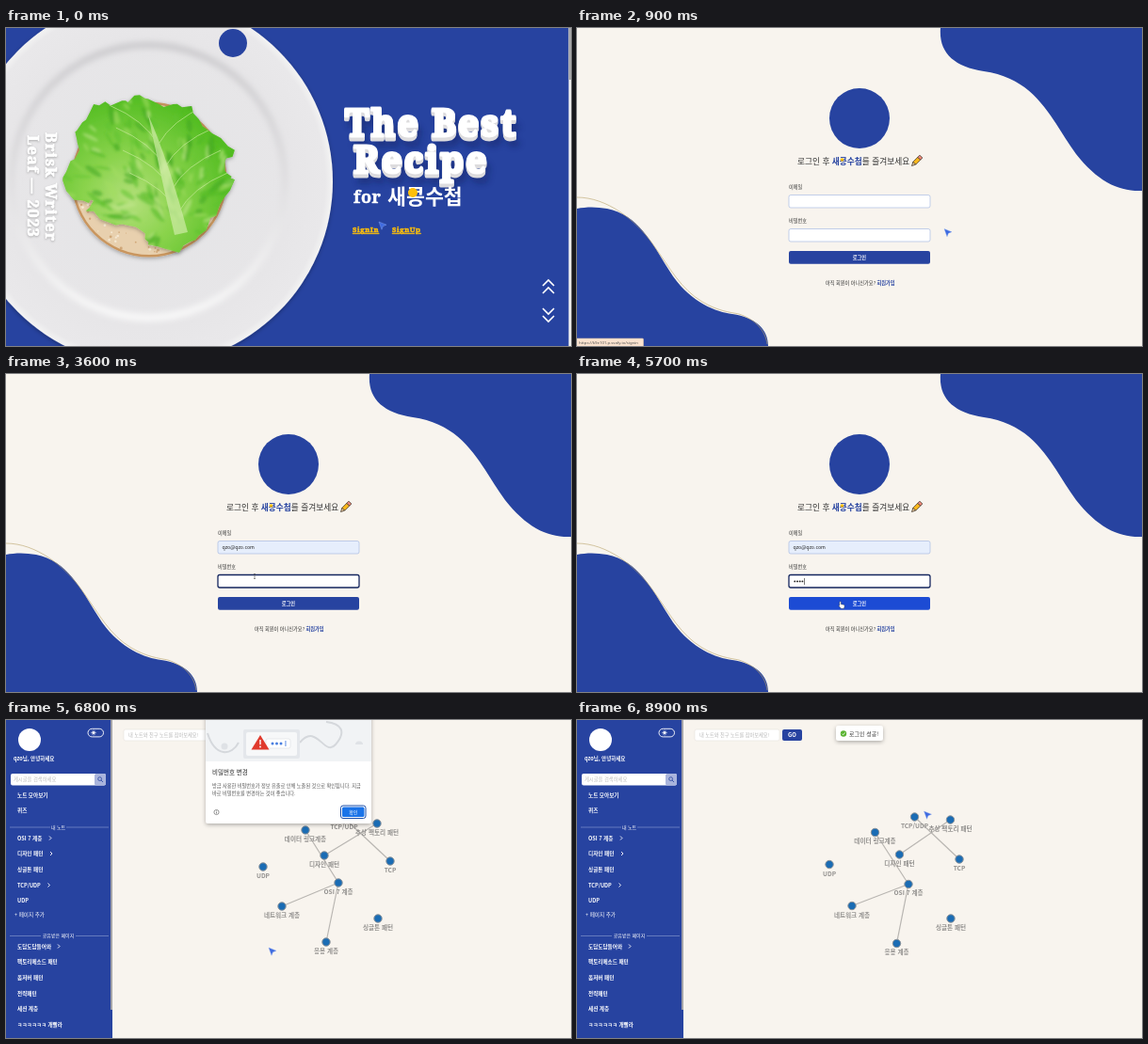
An HTML page for the animation above (9 s loop, 600 px wide and 338 px high).

```html
<!DOCTYPE html>
<html lang="ko">
<head>
<meta charset="utf-8">
<style>
html, body { margin: 0; width: 100%; height: 100%; overflow: hidden; background: #f8f4ee; }
svg { display: block; width: 600px; height: 338px; font-family: "Noto Sans CJK KR", "Noto Sans CJK", sans-serif; }
.serif { font-family: "Noto Serif", serif; font-weight: 900; stroke-linejoin: round; letter-spacing: .6px; }
.big { font-size: 39px; stroke-width: 2.8; letter-spacing: 2px; }
.side { font-size: 16px; stroke-width: .8; letter-spacing: 1.2px; }
.b { font-weight: 700; }
.m { text-anchor: middle; }
</style>
</head>
<body>
<svg id="stage" viewBox="0 0 600 338">
  <defs>
    <radialGradient id="china">
      <stop offset="0" stop-color="#e4e4e6"/><stop offset=".8" stop-color="#e7e6e8"/>
      <stop offset=".96" stop-color="#e9e8ea"/><stop offset="1" stop-color="#f3f3f3"/>
    </radialGradient>
    <linearGradient id="lip" x1="0" y1="0" x2="0" y2="1">
      <stop offset="0" stop-color="#cbcacd"/><stop offset=".5" stop-color="#dfdee0"/>
      <stop offset="1" stop-color="#fafafa"/>
    </linearGradient>
    <radialGradient id="green" gradientUnits="userSpaceOnUse" cx="132" cy="184" r="112">
      <stop offset="0" stop-color="#b4e07c"/><stop offset=".45" stop-color="#8ad34c"/>
      <stop offset="1" stop-color="#53bd22"/>
    </radialGradient>
    <filter id="soft"><feGaussianBlur stdDeviation="1.6"/></filter>
    <filter id="fade" x="-20%" y="-20%" width="140%" height="140%"><feGaussianBlur stdDeviation="3"/></filter>
    <filter id="shade" x="-30%" y="-30%" width="160%" height="160%">
      <feDropShadow dx="0" dy="1.5" stdDeviation="2" flood-opacity=".3"/>
    </filter>
  </defs>
  <g id="home"></g>
  <g id="login"></g>
  <g id="app"></g>
  <g id="hint"></g>
  <g id="pointer"></g>
</svg>
<script>
const BLUE = '#2743a0', CREAM = '#f8f4ee', YELLOW = '#fdbf0a';
const $ = id => document.getElementById(id);
const put = (id, html) => { $(id).innerHTML = html; };
const show = (id, on) => $(id).setAttribute('display', on ? 'inline' : 'none');
const set = (id, attrs) => { for (const k in attrs) $(id).setAttribute(k, attrs[k]); };
const clamp = v => Math.max(0, Math.min(1, v));
const ease = v => v * v * (3 - 2 * v);

const text = (x, y, size, str, fill = '#333', more = '') =>
  `<text x="${x}" y="${y}" font-size="${size}" fill="${fill}" ${more}>${str}</text>`;
const rect = (x, y, w, h, r, fill, more = '') =>
  `<rect x="${x}" y="${y}" width="${w}" height="${h}" rx="${r}" fill="${fill}" ${more}/>`;
const disc = (x, y, r, fill, more = '') =>
  `<circle cx="${x}" cy="${y}" r="${r}" fill="${fill}" ${more}/>`;
const line = (d, stroke, w, more = '') =>
  `<path d="${d}" fill="none" stroke="${stroke}" stroke-width="${w}" ${more}/>`;

let seed = 7;
const rnd = () => (seed = seed * 16807 % 2147483647) / 2147483647;

// Ruffled lettuce: a coarse outline, subdivided with jitter
function lettuce() {
  const rim = [[94,82],[121,80],[139,73],[169,82],[195,82],[211,108],[241,130],[232,150],[243,162],
    [222,198],[206,220],[185,238],[153,233],[147,214],[116,209],[84,193],[92,184],[68,182],[59,159],[76,129],[73,108]];
  const edge = rim.flatMap(([x, y], i) => {
    const [u, v] = rim[(i + 1) % rim.length];
    return [0, .25, .5, .75].map(k =>
      [x + (u - x) * k + rnd() * 6 - 3, y + (v - y) * k + rnd() * 6 - 3].map(n => n.toFixed(1)));
  });
  const shape = 'M' + edge.join('L') + 'Z';
  let folds = '', veins = '';
  const tones = ['#3fa51b', '#a3dc63', '#5ec22d', '#c2e78f', '#4eb823'];
  for (let i = 0; i < 170; i++) {
    const a = rnd() * 6.283, r = 15 + rnd() * 75;
    const x = 152 + r * Math.cos(a), y = 157 + r * Math.sin(a);
    const lean = Math.atan2(y - 208, x - 182) * 57.3 + rnd() * 60 - 30;
    folds += `<ellipse cx="${x}" cy="${y}" rx="${4 + rnd() * 9}" ry="${1 + rnd() * 2.5}" fill="${tones[i % 5]}"
      opacity=".55" transform="rotate(${lean} ${x} ${y})"/>`;
  }
  for (let i = 0; i < 8; i++) {
    const y = 196 - (i >> 1) * 24, x = 152 + (y - 92) * .3, side = i % 2 ? 1 : -1;
    veins += line(`M${x} ${y}q${side * 14} -26 ${side * 52} -42`, '#d3efa8', 1);
  }
  return `<clipPath id="leaf"><path d="${shape}"/></clipPath>
    <path d="${shape}" fill="url(#green)" filter="url(#shade)"/>
    <g clip-path="url(#leaf)"><g filter="url(#soft)">${folds}</g><g opacity=".6">${veins}
    <path d="M193 217L179 220Q166 165 151 92Q172 140 193 217" fill="#dcf0b8"/></g></g>`;
}

function crumbs() {
  let s = '';
  for (let i = 0; i < 140; i++) {
    const a = rnd() * 6.283, r = 62 + rnd() * 17;
    s += disc(152 + r * Math.cos(a), 161 + r * Math.sin(a), .5 + rnd(), i % 2 ? '#d0a778' : '#f5e8d2');
  }
  return s;
}

const title = (x, y, fill) => `<g class="serif big" fill="${fill}" stroke="${fill}" transform="translate(${x} ${y})">
  <text x="360" y="115">The Best</text><text x="369" y="154">Recipe</text></g>`;
const slab = (x, y, size, str, fill, more = '') =>
  text(x, y, size, str, fill, `class="serif" stroke="${fill}" stroke-width=".5" ${more}`);

put('home', rect(0, 0, 600, 338, 0, BLUE) +
  disc(151, 163, 196, 'url(#china)', 'filter="url(#shade)"') +
  disc(151, 163, 145, 'none', 'stroke="url(#lip)" stroke-width="7" filter="url(#fade)"') +
  `<g id="dish">${disc(152, 161, 82.5, '#c9965f', 'filter="url(#shade)"')}${disc(152, 161, 80, '#e8d0ae')}
    ${crumbs()}${lettuce()}${disc(241, 16, 15, BLUE)}</g>
  <g class="serif side" fill="#fff" stroke="#fff" style="filter:drop-shadow(0 1px 1px #8889)">
    <text transform="translate(42 111) rotate(90)">Brisk Writer</text>
    <text transform="translate(23 114) rotate(90)">Leaf — 2023</text></g>
  <g opacity=".4" filter="url(#fade)">${title(4, 10, '#0b1a55')}</g>` +
  [4, 3, 2, 1].map(d => title(0, d, '#dddcde')).join('') + title(0, 0, '#fff') +
  slab(369, 186, 18, 'for', '#fff') +
  text(405, 187, 21.7, '새콩수첩', '#fff', 'class="b"') + disc(432, 175, 5, YELLOW) +
  slab(368, 217, 7.6, 'SignIn', YELLOW, 'id="signin" text-decoration="underline"') +
  slab(410, 217, 7.6, 'SignUp', YELLOW, 'text-decoration="underline"') +
  line('M570 274l6-6 6 6m-12 8l6-6 6 6M570 298l6 6 6-6m-12 8l6 6 6-6', '#fff', 1.6, 'id="chevrons"') +
  rect(597.5, 0, 2.5, 338, 0, '#f1f1f1') + rect(597.5, 0, 2.5, 55, 0, '#a9a9ab'));

put('login', rect(0, 0, 600, 338, 0, CREAM) +
  `<path fill="${BLUE}" d="M386 0C384 26 400 41 432 46C489 54 504 98 530 134C553 163 575 174 600 173V0Z
    M0 192C10 190 21 190 32 192C68 199 82 234 102 264C122 292 148 302 165 304C190 308 203 320 203 338H0Z"/>` +
  line('M0 180C32 180 62 204 80 229C100 257 110 277 133 291C150 301 162 302 172 304C190 310 200 322 202 336', '#b9a36a', .6) +
  disc(300, 96, 32, BLUE) +
  text(234, 145, 8.7, `로그인 후 <tspan class="b" fill="${BLUE}">새콩수첩</tspan>를 즐겨보세요`) +
  disc(281.5, 140, 1.8, YELLOW) +
  `<g transform="translate(355.5 146.5) rotate(-45)" stroke="#3a3024" stroke-width=".7">
    <path d="M0 0l4-2v4z" fill="#f3d3a4"/><path d="M4-2h7v4h-7z" fill="#fbb91c"/><path d="M11-2h3v4h-3z" fill="#ef8a7c"/></g>` +
  text(225, 171, 5.2, '이메일') + text(225, 207, 5.2, '비밀번호') +
  rect(225, 177.5, 150, 13.5, 2, '#fff', 'id="mail"') + text(229.5, 186.2, 5.2, '', '#222', 'id="mailText"') +
  rect(225, 213.5, 150, 13.5, 2, '#fff', 'id="pass"') +
  `<g id="dots">${[0, 1, 2, 3].map(i => disc(231.3 + i * 2.7, 220.4, .95, '#222')).join('')}</g>` +
  rect(241, 217, .6, 7, 0, '#222', 'id="caret"') +
  rect(225, 237, 150, 13.8, 2, BLUE, 'id="enter"') + text(300, 245.8, 5.2, '로그인', '#fff', 'class="b m"') +
  text(264, 273, 5.2, `아직 회원이 아니신가요? <tspan class="b" fill="${BLUE}">회원가입</tspan>`));

// Note graph: label, opening place, resting place
const nodes = [
  ['데이터 링크계층', 318, 117, 316.5, 119.5], ['TCP/UDP', 359, 104, 358.5, 103],
  ['추상 팩토리 패턴', 394, 110, 396.5, 106], ['디자인 패턴', 338, 144, 342.5, 143],
  ['UDP', 273, 156, 268, 153.5], ['TCP', 408, 150, 406, 148], ['OSI 7 계층', 353, 173, 352, 174.5],
  ['네트워크 계층', 293, 198, 292, 197.5], ['싱글톤 패턴', 395, 211, 397, 211], ['응용 계층', 340, 236, 339.5, 237.5]];
const links = [[0, 6], [1, 5], [2, 3], [6, 7], [6, 9]];

const item = (y, str, chevron) => text(12, y + 2, 5.6, str, '#fff', 'class="b"') +
  (chevron ? line(`M${chevron - 1} ${y - 2}l2 2-2 2`, '#fff', .9) : '');
const divider = (y, str, a, b) => text(55.5, y + 1.8, 5, str, '#fff', 'class="m"') +
  line(`M4 ${y}H${a}M${b} ${y}H109`, '#8fa0d4', .6);

put('app', rect(0, 0, 600, 338, 0, CREAM) +
  rect(125, 10, 90, 12, 2, '#fff', 'stroke="#e6e2dc" stroke-width=".6"') +
  text(130, 18, 5.2, '내 노트와 친구 노트를 잡아보세요!', '#b5b5b5') +
  rect(218, 10, 21, 12, 2, BLUE) + text(228.5, 18.2, 6, 'GO', '#fff', 'class="b m"') +
  '<g id="graph"></g>' +
  rect(0, 0, 113, 338, 0, BLUE) + rect(111, 0, 2, 308, 0, '#a3a3a8') +
  disc(25, 21, 12, '#fff') +
  rect(87, 9.3, 16.5, 8.6, 4.3, 'none', 'stroke="#fff" stroke-width=".9"') +
  disc(93, 13.6, 1.4, '#fff') + line('M93 10.6v6M90 13.6h6M90.9 11.5l4.2 4.2m0-4.2l-4.2 4.2', '#fff', .5) +
  text(8, 43, 5.5, 'qzo님, 안녕하세요', '#fff', 'class="b"') +
  rect(5, 57, 101, 12.5, 2, '#fff') + rect(94, 57, 12, 12.5, 2, '#a9b4dc') +
  line('M101 64l2 2', BLUE, .8) + disc(99.6, 62.6, 1.9, 'none', `stroke="${BLUE}" stroke-width=".8"`) +
  text(8, 65, 5.3, '게시글을 검색하세요', '#bcbcbc') +
  item(80, '노트 모아보기') + item(95.5, '퀴즈') + divider(114, '내 노트', 47, 64) +
  item(125.5, 'OSI 7 계층', 47) + item(142, '디자인 패턴', 48) + item(158.5, '싱글톤 패턴') +
  item(175.5, 'TCP/UDP', 45.5) + item(192, 'UDP') + text(9, 209, 5.6, '+ 페이지 추가', '#fff') +
  divider(229.5, '공유받은 페이지', 37, 74) +
  item(240.5, '도담도담들어와', 56) + item(257, '팩토리메소드 패턴') + item(273.5, '옵저버 패턴') +
  item(290.5, '전략패턴') + item(307, '세션 계층') + item(323.5, 'ㅋㅋㅋㅋㅋㅋ 개빨라') +
  `<g id="toast">${rect(275, 6, 50, 16, 3, '#fff', 'filter="url(#shade)"')}${disc(283, 14.5, 3.2, '#5ab432')}
    ${line('M281.4 14.6l1.2 1.2 2-2.4', '#fff', .8)}${text(289, 16.7, 6, '로그인 성공!')}</g>
  <g id="dialog">${rect(212, -6, 176, 116, 3, '#fff', 'filter="url(#shade)"')}${rect(212, -6, 176, 50, 0, '#f1f3f5')}
    ${line('M214 14C222 40 240 38 247 24M312 24C330 2 338 40 350 26S356 4 340 2', '#d5d8dc', 2)}
    ${disc(232, 28, 3.5, '#dfe2e6')}${rect(252, 10, 60, 31, 2, '#e4e7eb')}${rect(255, 13, 54, 25, 2, '#f7f8f9')}
    ${rect(276, 20, 26, 10, 2, '#fff', 'stroke="#dadde1" stroke-width=".6"')}
    <path d="M270 16l9.5 15.5h-19z" fill="#e03a2d"/>${rect(269.3, 21, 1.4, 5.2, 0, '#fff')}${disc(270, 28.5, .9, '#fff')}
    ${[283, 287.5, 292].map(x => disc(x, 25, 1.5, '#4a7fe0')).join('')}${rect(296.5, 22, .9, 6, 0, '#4a7fe0')}
    <path d="M371 26a4 3.5 0 0 1 8 0z" fill="#dfe2e6"/>
    ${text(219, 58, 6.5, '비밀번호 변경', '#222', 'font-weight="500"')}
    ${text(219, 72, 5.2, '방금 사용한 비밀번호가 정보 유출로 인해 노출된 것으로 확인됩니다. 지금', '#555')}
    ${text(219, 79.8, 5.2, '바로 비밀번호를 변경하는 것이 좋습니다.', '#555')}
    ${disc(223.5, 98, 2.6, 'none', 'stroke="#555" stroke-width=".6"')}${line('M223.5 97.5v2m0-3.2v.6', '#555', .7)}
    ${rect(355.5, 91, 26.5, 13.5, 2.5, '#fff', 'stroke="#1d4fa8" stroke-width="1"')}
    ${rect(357, 92.5, 23.5, 10.5, 1.5, '#1a73e8')}${text(368.8, 99.7, 5, '확인', '#fff', 'class="m"')}</g>`);

put('hint', rect(-1, 330, 71.5, 9, 1, '#fbe3cf', 'stroke="#d8bfa8" stroke-width=".6"') +
  text(2, 335.8, 4.3, 'https://k9e101.p.ssafy.io/signin', '#555', 'style="font-family:\'Noto Sans\',sans-serif"'));

put('pointer', `<path id="arrow" d="M0 0l8 3.2-3.6 1.5L3 8.3z" fill="#3f6be0" stroke="#8fabef" stroke-width=".4"/>
  <path id="hand" d="M0 .6q.8-1 1.5 0V3l3 .6q1 .4.8 1.6L4.6 7.6H1.6L-1 4.6q.1-.9 1 .1z" fill="#fff" stroke="#333" stroke-width=".4"/>
  <path id="beam" d="M-1-2.5h2M0-2.5v5M-1 2.5h2" fill="none" stroke="#555" stroke-width=".6"/>`);

// Pointer stops: time, x, y, shape from then on
const stops = [[0, 396, 206, 'arrow'], [300, 391, 213, 'hand'], [700, 391, 213, 'arrow'], [900, 390, 213.5, 'arrow'],
  [1000, 390, 213.5, 'arrow'], [1700, 300, 184, 'beam'], [2900, 300, 184, 'beam'], [3400, 264, 215, 'beam'],
  [3600, 264, 215, 'beam'], [4400, 271, 220, 'beam'], [4700, 271, 220, 'beam'], [5200, 278.5, 241, 'hand'],
  [6000, 279, 242, 'arrow'], [7000, 279, 242, 'arrow'], [7900, 368.5, 97, 'arrow'], [9000, 368.5, 97, 'arrow']];

function movePointer(t) {
  const i = stops.findIndex((s, n) => t < (stops[n + 1] || [Infinity])[0]);
  const [t0, x, y, kind] = stops[i], [t1, u, v] = stops[i + 1] || [t0 + 1, x, y];
  const k = ease((t - t0) / (t1 - t0));
  set('pointer', { transform: `translate(${x + (u - x) * k} ${y + (v - y) * k})` });
  for (const id of ['arrow', 'hand', 'beam']) show(id, id === kind);
}

function drawHome(t) {
  const link = t >= 300 ? '#fff' : YELLOW;
  set('dish', { transform: `rotate(${t / 30} 151 163)` });
  set('signin', { fill: link, stroke: link });
  set('chevrons', { transform: `translate(0 ${1.3 * (Math.cos(t / 500 * Math.PI) - 1)})` });
}

function drawLogin(t) {
  const mailOn = t >= 2000 && t < 3400, passOn = t >= 3400;
  const border = on => on ? { stroke: '#14265e', 'stroke-width': 1.3 } : { stroke: '#a9bce2', 'stroke-width': .7 };
  set('mail', { fill: t >= 3000 ? '#e6eefc' : '#fff', ...border(mailOn) });
  set('pass', border(passOn));
  $('mailText').textContent = 'qzo@qzo.com'.slice(0, Math.max(0, (t - 1800) / 100));
  const typed = [3900, 4100, 4300, 4400].filter(at => t >= at).length;
  [...$('dots').children].forEach((dot, i) => dot.setAttribute('opacity', i < typed ? 1 : 0));
  show('caret', typed === 4 && Math.floor((t - 400) / 500) % 2 === 0);
  set('enter', { fill: t >= 5200 ? '#1c4bd4' : BLUE });
}

function drawApp(t) {
  const k = Math.exp((6800 - t) / 450);
  const at = nodes.map(([, x, y, u, v]) => [u + (x - u) * k, v + (y - v) * k]);
  put('graph', links.map(([a, b]) => line(`M${at[a]}L${at[b]}`, '#b9b6b2', 1.2)).join('') +
    nodes.map(([name], i) => disc(...at[i], 4.2, '#1a6cb4', 'stroke="#8b9299" stroke-width="1"') +
      text(at[i][0], at[i][1] + 12, 6.6, name, '#92908e', 'class="m b"')).join(''));
  set('toast', { transform: `translate(0 ${-24 * (1 - ease(clamp((t - 5900) / 300)))})` });
  set('dialog', { opacity: clamp((t - 6200) / 300) * clamp((8900 - t) / 300) });
}

function frame(now) {
  const t = Math.floor(now % 9000 / 100) * 100;
  const scene = t < 700 ? 'home' : t < 6000 ? 'login' : 'app';
  for (const id of ['home', 'login', 'app']) show(id, id === scene);
  ({ home: drawHome, login: drawLogin, app: drawApp })[scene](t);
  show('hint', t >= 300 && t < 1100);
  movePointer(t);
  requestAnimationFrame(frame);
}
frame(performance.now());
</script>
</body>
</html>
```
